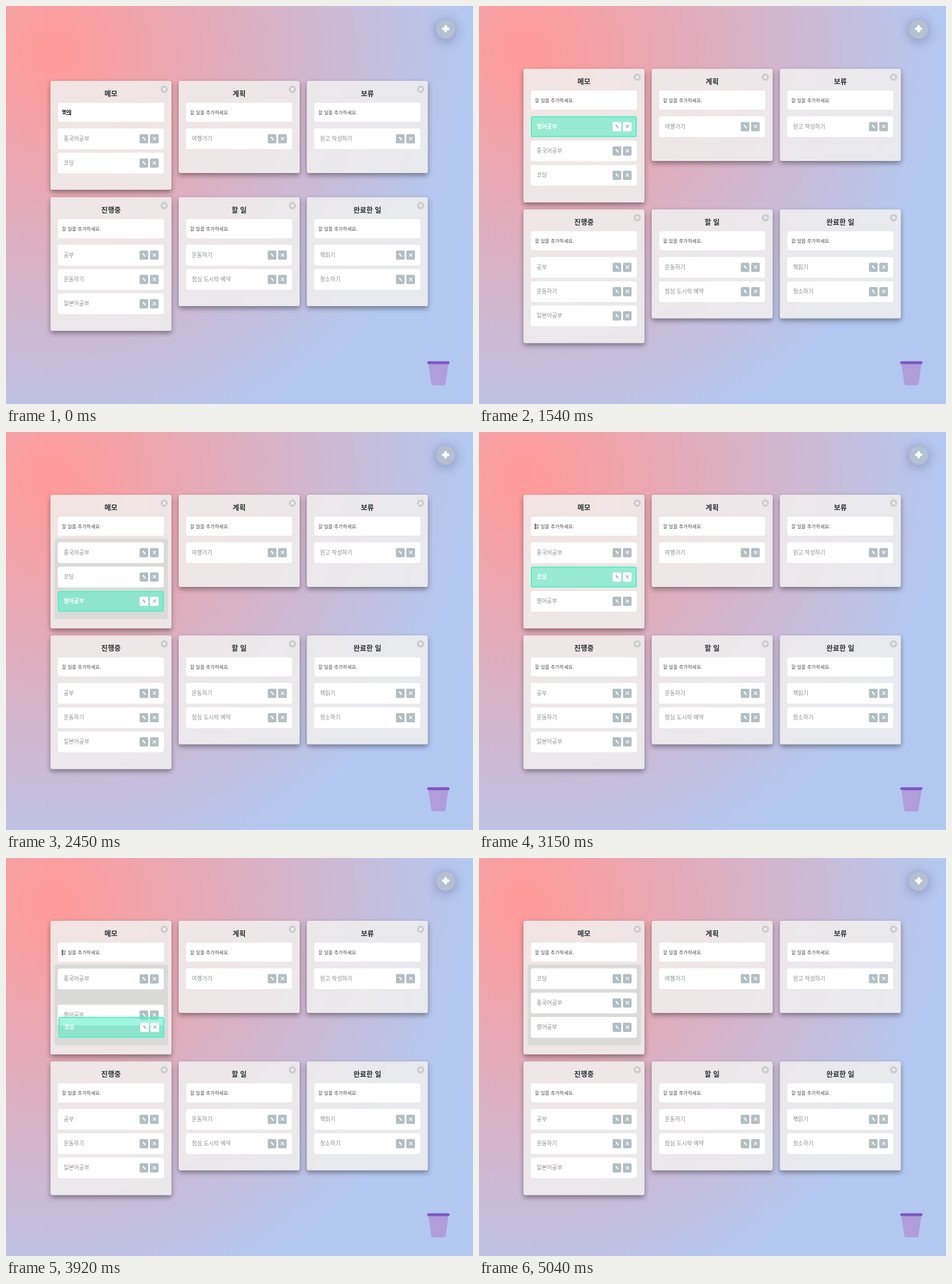
An HTML page that plays this animation: 811x691 px, repeating every 5250 ms.

```html
<!DOCTYPE html>
<html lang="ko">
<head>
<meta charset="utf-8">
<title>Todo board</title>
<style>
html, body { margin: 0; width: 100%; height: 100%; overflow: hidden; }
body {
  position: relative;
  background: radial-gradient(circle 722px at 81px 80px, #ff9b9a 3%, #b3c8f1 100%);
  font-family: "Noto Sans CJK KR", "Noto Sans CJK", "Noto Sans", sans-serif;
}
div, svg { position: absolute; box-sizing: border-box; }
.card {
  width: 210px; border-radius: 3.5px; left: 0; top: 0;
  background: rgba(241, 240, 239, .86);
  box-shadow: 0 4px 8px rgba(0, 0, 0, .4);
}
.title {
  width: 100%; top: 12px; line-height: 20px; text-align: center;
  font-size: 12.3px; font-weight: 700; color: #2d3436;
}
.close { left: 190.7px; top: 7.5px; }
.input, .item { left: 12.7px; width: 184.2px; border-radius: 3.5px; white-space: nowrap; }
.input {
  top: 38.3px; height: 33px; line-height: 32px; padding-left: 7px;
  background: #fff; color: #4a4a4a; font-size: 8.3px;
}
.typed { color: #000; font-weight: 700; font-size: 8.1px; }
.typed u { text-underline-offset: 1px; }
.caret { width: 1px; height: 10px; top: 49.5px; background: #111; }
.item {
  left: 0; top: 0; height: 36px; line-height: 35px; padding-left: 10px;
  background: #fff; color: #8d8d8d; font-size: 9.7px;
}
.item svg { top: 10.3px; color: #fff; background: #b2bec3; border-radius: 2px; }
.drag {
  z-index: 2; background: rgba(85, 239, 196, .56); color: #fff; font-weight: 700;
  outline: 2px solid #55efc4; outline-offset: -2px;
}
.drag svg { color: #a3b1b6; background: #fff; }
.zone {
  left: 6.7px; top: 76px; width: 197px; height: 139.5px;
  border-radius: 3px; background: #dadad9;
}
.add {
  left: 746.5px; top: 23.5px; width: 33px; height: 33px; border-radius: 50%;
  background: #b4c0d2; box-shadow: 0 3px 18px 2px rgba(70, 70, 120, .36);
}
</style>
</head>
<body>
<div class="add"><svg width="33" height="33"><path d="M16.5 9.5v12M10.5 15.5h12" stroke="#fff" stroke-width="4.6"/></svg></div>
<svg style="left:731px;top:616px" width="40" height="44">
  <path d="M2.3 4H37.5L32.3 40Q32 42.5 29.6 42.5H10.4Q8 42.5 7.6 40Z" fill="#b09dda"/>
  <rect x=".5" y=".7" width="38.7" height="5" rx="2.5" fill="#7e57c2"/>
</svg>
<script>
const LOOP = 5250, STEP = 70, ADDED = 630;
const LEFT = 77.3, INSET = 12.7, PITCH = 42.2, FIRST = 82.5;
const HINT = '할 일을 추가하세요.';
const TYPING = ['영어', '영억', '영어고', '영어공', '영어공ㅂ', '영어공부'];
const COLUMNS = [
  ['메모', ['영어공부', '중국어공부', '코딩']],
  ['계획', ['여행가기']],
  ['보류', ['원고 작성하기']],
  ['진행중', ['공부', '운동하기', '일본어공부']],
  ['할 일', ['운동하기', '점심 도시락 예약']],
  ['완료한 일', ['책읽기', '청소하기']],
];

// hops: the pointer goes to x, y between two times; swaps: when a neighbour gives way
const DRAGS = [
  { item: 0, from: 1540, to: 2520,
    hops: [{ start: 1540, end: 1750, x: 102.5, y: 270 }],
    swaps: [{ at: 1616, other: 1 }, { at: 1670, other: 2 }] },
  { item: 2, from: 3150, to: 5040,
    hops: [{ start: 3150, end: 3430, x: 101, y: 182 },
           { start: 3500, end: 3920, x: 91, y: 276 },
           { start: 4130, end: 4480, x: 92, y: 190 }],
    swaps: [{ at: 3230, other: 1 }, { at: 3786, other: 1 }, { at: 3888, other: 0 },
            { at: 4220, other: 0 }, { at: 4330, other: 1 }] },
];

const ramp = (t, start, span) => Math.min(1, Math.max(0, (t - start) / span));
const smooth = p => p * p * (3 - 2 * p);
const easeOut = p => 1 - (1 - p) ** 4;
const mix = (a, b, p) => a + (b - a) * p;
const slotY = slot => FIRST + slot * PITCH;

const add = (parent, cls, html = '') => {
  const el = document.createElement('div');
  el.className = cls;
  el.innerHTML = html;
  return parent.appendChild(el);
};
const move = (el, x, y) => { el.style.transform = `translate(${x}px, ${y}px)`; };

const icon = (x, path) =>
  `<svg style="left:${x}px" width="15.3" height="15.3">${path}</svg>`;
const PENCIL = icon(141.5, '<path d="M5.7 5.1l3.7 4.7" stroke="currentColor" stroke-width="2.2"/><path d="M8.8 10.6l1.8.6-.2-1.9z" fill="currentColor"/>');
const CROSS = icon(160, '<path d="M5 5l5.4 5.4M10.4 5L5 10.4" stroke="currentColor" stroke-width="1.3"/>');
const CLOSE = '<svg class="close" width="13" height="13"><circle cx="6.5" cy="6.5" r="6.3" fill="#cdcccc"/><path d="M4 4l5 5M9 4l-5 5" stroke="#fff" stroke-width="1.2"/></svg>';

const cards = COLUMNS.map(([name, tasks], i) => {
  const el = add(document.body, 'card', `<div class="title">${name}</div>${CLOSE}`);
  const input = add(el, 'input', HINT);
  const zone = i ? null : add(el, 'zone');
  const items = tasks.map((task, n) => {
    const item = add(el, 'item', task + PENCIL + CROSS);
    move(item, INSET, slotY(n));
    return item;
  });
  return { el, input, zone, items, x: LEFT + (i % 3) * 222.6, row: Math.floor(i / 3) };
});
const memo = cards[0];
memo.el.style.zIndex = 1;
const caret = add(memo.el, 'caret');

// Final slot of every memo item, and where it is while making room.
function order(t) {
  const slots = t < ADDED ? [-1, 0, 1] : [0, 1, 2];
  const shown = [...slots];
  for (const { item, swaps } of DRAGS) {
    for (const { at, other } of swaps.filter(s => t >= s.at)) {
      [slots[item], slots[other]] = [slots[other], slots[item]];
      shown[other] = mix(slots[item], slots[other], easeOut(ramp(t, at, 200)));
      shown[item] = slots[item];
    }
  }
  return { slots, shown };
}

function dragged({ item, from, to, hops }, t, top) {
  let x = INSET, y = slotY(order(from).slots[item]);
  const toward = (x2, y2, p) => { x = mix(x, x2, p); y = mix(y, y2, p); };
  for (const { start, end, x: hx, y: hy } of hops)
    toward(hx - memo.x, hy - top, smooth(ramp(t, start, end - start)));
  toward(INSET, slotY(order(t).slots[item]), easeOut(ramp(t, to - 330, 330)));
  return [x, y];
}

function drawInput(t) {
  const typing = t < ADDED;
  const text = TYPING[Math.min(TYPING.length - 1, Math.max(0, t / STEP - 1))];
  const html = typing ? `${text.slice(0, -1)}<u>${text.slice(-1)}</u>` : HINT;
  memo.input.classList.toggle('typed', typing);
  if (memo.input.innerHTML !== html) memo.input.innerHTML = html;
  move(caret, 19.7 + (typing ? text.length * 7.5 : 0), 0);
  // The blink starts again during the second drag.
  const blink = Math.floor((t - (t < 3430 ? 595 : 3430)) / 525);
  caret.style.opacity = typing || blink % 2 === 0 ? 1 : 0;
}

function draw(t) {
  const added = t >= ADDED, tops = added ? [109, 353.2] : [130, 332.1];
  for (const card of cards) {
    const count = card.items.length - (card === memo && !added ? 1 : 0);
    card.el.style.height = Math.max(159.7, 105 + count * PITCH) + 'px';
    move(card.el, card.x, tops[card.row]);
  }
  const { shown } = order(t);
  const held = DRAGS.find(d => t >= d.from && t < d.to);
  memo.items.forEach((el, i) => {
    const active = held?.item === i;
    el.classList.toggle('drag', active);
    move(el, ...(active ? dragged(held, t, tops[0]) : [INSET, slotY(shown[i])]));
  });
  memo.items[0].style.visibility = added ? 'visible' : 'hidden';
  memo.zone.style.opacity = DRAGS.reduce(
    (sum, d) => sum + ramp(t, d.from, 300) - ramp(t, d.to + 210, 200), 0);
  drawInput(t);
}

const began = performance.now();
function tick() {
  const t = (performance.now() - began) % LOOP;
  draw(Math.floor(t / STEP) * STEP);
  requestAnimationFrame(tick);
}
tick();
</script>
</body>
</html>
```
